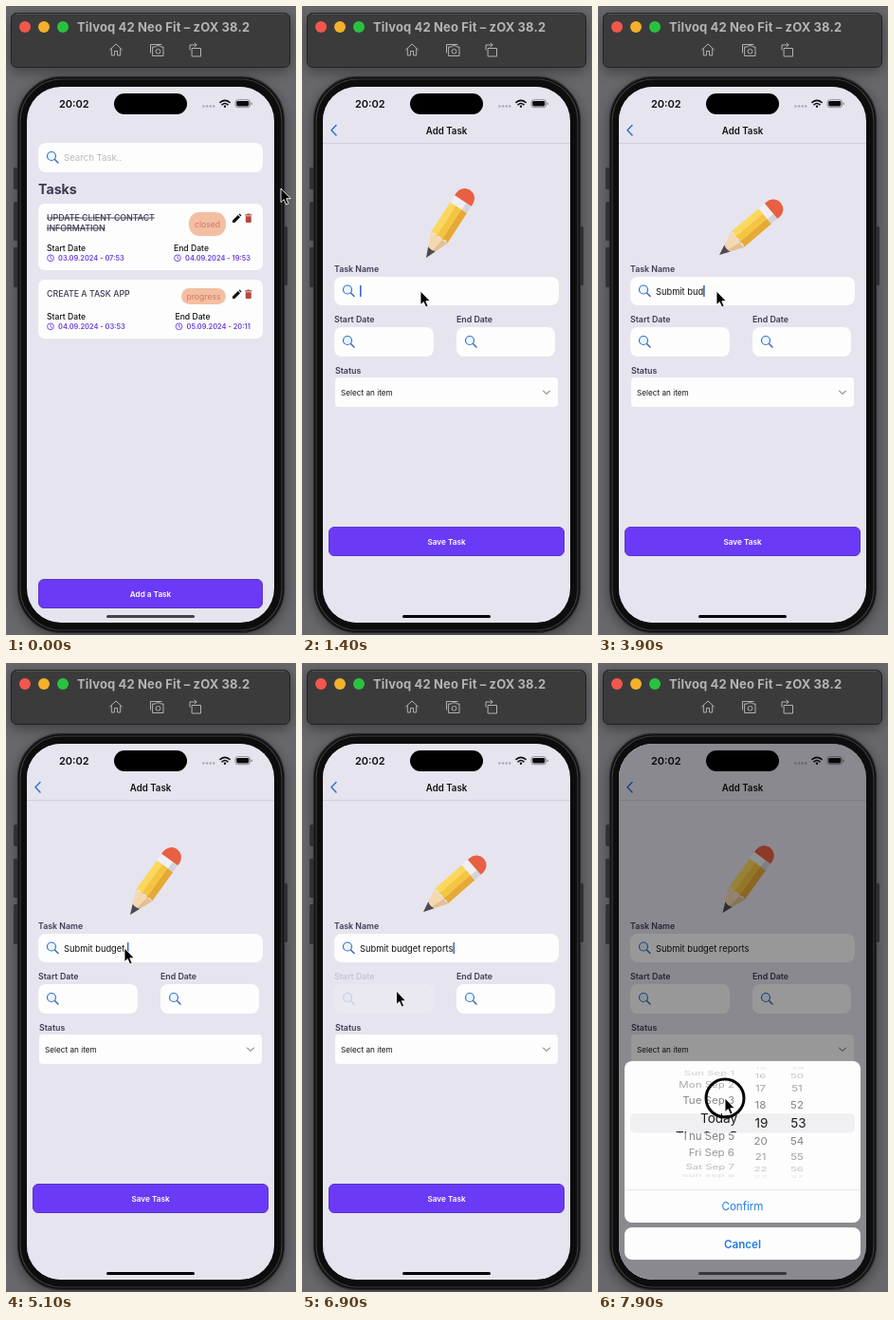
Animation, 306 px wide and 662 px high, one loop 8000 ms. Source, as an HTML page:

```html
<!DOCTYPE html>
<html lang="en">
<head>
<meta charset="utf-8">
<title>Task app</title>
<style>
html, body { margin: 0; width: 100%; height: 100%; overflow: hidden; background: #68676b; }
svg { position: fixed; left: 0; top: 0; font-family: Inter, Roboto, sans-serif; }
text { white-space: pre; }
</style>
</head>
<body>
<svg id="stage" width="306" height="662" viewBox="0 0 306 662"></svg>
<script>
const LOOP = 8000, STEP = 100;
const INK = '#3c3b54', VIOLET = '#6b3af7', BLUE = '#2f73d0', PAPER = '#e6e4ee', WHITE = '#fdfdfd';

// Markup helpers
const rect = (x, y, w, h, r, fill, more = '') =>
  `<rect x="${x}" y="${y}" width="${w}" height="${h}" rx="${r}" fill="${fill}" ${more}/>`;
const text = (x, y, size, weight, fill, str, more = '') =>
  `<text x="${x}" y="${y}" font-size="${size}" font-weight="${weight}" fill="${fill}" ${more}>${str}</text>`;
const mid = 'text-anchor="middle"';
const line = (d, color, width = 1, more = '') =>
  `<path d="${d}" fill="none" stroke="${color}" stroke-width="${width}" stroke-linecap="round" stroke-linejoin="round" ${more}/>`;
const shape = (d, fill) => `<path d="${d}" fill="${fill}"/>`;
const disc = (x, y, r, fill, more = '') => `<circle cx="${x}" cy="${y}" r="${r}" fill="${fill}" ${more}/>`;
const at = (x, y, body) => `<g transform="translate(${x} ${y})">${body}</g>`;

const lens = (x, y) => at(x, y,
  disc(0, 0, 4.5, '#eef5fc', `stroke="${BLUE}" stroke-width="1.2"`) +
  line('M3.5 3.5L7 7', '#3a6cb4', 1.5));
const clock = (x, y) => at(x, y,
  disc(0, 0, 3.4, 'none', `stroke="${VIOLET}" stroke-width=".9"`) + line('M0-2V.3L1.5 1', VIOLET, .8));
const button = (x, y, w, label) =>
  rect(x + .5, y - .5, w - 1, 30, 5.5, VIOLET, 'stroke="#5a35c4"') +
  text(152.5, y + 18, 8.2, 600, '#fff', label, mid);

function stamp(x, y, label, when) {
  return text(x, y, 8.6, 500, '#111', label) + clock(x + 4, y + 7.3) +
    text(x + 12, y + 10, 7.4, 600, '#6a3fe0', when);
}

function card(y, h, lines, badge, start, end, endX) {
  const [bx, by, bw, bh, word] = badge;
  return rect(34, y, 237, h, 7, WHITE) +
    lines.map((s, i) => text(43, y + 18 + i * 11, 8.8, 500, INK, s,
      lines.length > 1 ? 'text-decoration="line-through"' : '')).join('') +
    rect(bx, by, bw, bh, Math.min(11, bh / 2), '#f3bfa3') +
    text(bx + bw / 2, by + bh / 2 + 3, 8.6, 400, '#d8775a', word, mid) +
    at(243.5, y + 15.5, shape('M-4.5 4.5V2.2L1.3-3.6 3.6-1.3-2.2 4.5ZM2-4.2 3-5.1 5.1-3 4.2-2Z', '#111')) +
    at(255.8, y + 15.5, shape('M-3.6-4.2H-1.6L-1-5H1L1.6-4.2H3.6V-3H-3.6ZM-3-2.3H3V3.6Q3 4.6 2 4.6H-2Q-3 4.6-3 3.6Z', '#b5483f')) +
    stamp(43, y + h - 20, 'Start Date', start) + stamp(endX, y + h - 20, 'End Date', end);
}

const listScreen = rect(22, 85, 261, 564, 0, PAPER) +
  rect(34, 144, 237, 31, 8, WHITE) + lens(48, 158) +
  text(61, 163, 9.6, 400, '#b9b9bf', 'Search Task..') +
  text(34, 198, 14.2, 700, INK, 'Tasks') +
  card(208, 70, ['UPDATE CLIENT CONTACT', 'INFORMATION'], [193, 217, 39, 25, 'closed'],
    '03.09.2024 - 07:53', '04.09.2024 - 19:53', 177) +
  card(288, 62, ['CREATE A TASK APP'], [185, 297, 47, 17, 'progress'],
    '04.09.2024 - 03:53', '05.09.2024 - 20:11', 178.5) +
  button(34, 604, 237, 'Add a Task');

const label = (x, y, s) => text(x, y, 8.8, 600, INK, s);
// Points up from its tip, 85 long, with a round eraser
const pencil =
  shape('M0 0L-10.5-25H10.5Z', '#f3d8b2') + shape('M0 0L10.5-25H4Z', '#e5bf94') +
  shape('M0 0L-4.6-11Q0-9 4.6-11Z', '#4b4a57') +
  shape('M-10.5-25Q-7-28-3.5-25V-64H-10.5Z', '#fbd85c') +
  shape('M-3.5-25Q0-28 3.5-25V-64H-3.5Z', '#f5c53f') +
  shape('M3.5-25Q7-28 10.5-25V-64H3.5Z', '#e6a935') +
  shape('M-10.5-63H10.5V-72H-10.5Z', '#f0eff4') + shape('M4-63H10.5V-72H4Z', '#d5d3dd') +
  shape('M-10.5-71.5H10.5V-74.5A10.5 10.5 0 0 0-10.5-74.5Z', '#e95f43');

const formScreen = rect(22, 85, 261, 564, 0, PAPER) +
  line('M22 144.5H283', '#cecbd6', .8) + line('M36 125.5L31 130.7 36 136', BLUE, 1.5) +
  text(152.5, 134.5, 9.7, 600, '#111', 'Add Task', mid) +
  `<g id="pencil">${pencil}</g>` +
  label(34, 280, 'Task Name') + rect(34, 285, 237, 30, 8, WHITE) + lens(48, 298.5) +
  '<text id="typed" x="61" y="304" font-size="9.3" fill="#111"></text>' +
  rect(0, 294, 1.6, 12, .5, '#3f66d6', 'id="caret"') +
  `<g id="start">${label(34, 333, 'Start Date') + rect(34, 338, 105, 31, 8, WHITE) + lens(48, 352)}</g>` +
  label(163, 333, 'End Date') + rect(163, 338, 104, 31, 8, WHITE) + lens(177, 352) +
  label(35, 387, 'Status') + rect(35, 391, 235, 31, 4, WHITE) +
  text(41, 410, 8.2, 400, '#111', 'Select an item') + line('M254.5 405L258 408.5 261.5 405', '#444', .9) +
  button(28, 549, 249, 'Save Task');

const statusBar = text(56, 107, 11, 600, '#0b0b0d', '20:02') +
  rect(114, 92, 77, 22, 11, '#000') +
  [208.5, 212.2, 215.8, 219.3].map(x => disc(x, 105.5, 1.2, '#a9a8b0')).join('') +
  line('M226 101.4Q231 97.2 236 101.4M228 103.8Q231 101.2 234 103.8', '#0b0b0d', 1.6) +
  disc(231, 105.8, 1.2, '#0b0b0d') +
  rect(242, 98.7, 15.5, 8, 2.4, 'none', 'stroke="#77767c" stroke-width=".8"') +
  rect(243.2, 99.9, 13.1, 5.6, 1.4, '#0b0b0d') + rect(258.6, 101.4, 1.1, 2.7, .5, '#77767c');

const sheet = rect(28, 419, 249, 170, 8, WHITE) + '<g id="rows"></g>' +
  rect(34, 474, 237, 20.5, 5, '#f0f0f2') + '<g id="focus" clip-path="url(#band)"></g>' +
  line('M28 554.5H277', '#dcdce0', .7) +
  text(152.5, 576, 11.6, 400, '#1f7bea', 'Confirm', mid) +
  rect(28, 594, 249, 34, 8, WHITE) + text(152.5, 615.5, 11.6, 600, '#1f7bea', 'Cancel', mid);

const windowBar = rect(5.5, 7.5, 294, 57, 6, '#3a3a3b', 'stroke="#202021" filter="url(#shadow)"') +
  line('M11 8.4H294', '#5a5a5c', .8) +
  ['#f2564d', '#f2b02c', '#2bc140'].map((c, i) => disc(20 + 20 * i, 22, 6, c)).join('') +
  text(75, 26.5, 13, 700, '#b4b4b6', 'Tilvoq 42 Neo Fit – zOX 38.2', 'letter-spacing=".13"') +
  line('M109.5 46L116 40 122.5 46M111.3 45V52H114.4V47.5H117.6V52H120.7V45', '#b2b2b4') +
  line('M152.5 49V40.5H164M155 43H157.8L158.8 41.8H162.2L163.2 43H166V52.5H155Z', '#b2b2b4') +
  disc(160.5, 47.8, 2.4, 'none', 'stroke="#b2b2b4"') +
  line('M196.5 44.5H205.5V53H196.5ZM194 46V41H201M199 39L201 41 199 43', '#b2b2b4');

const phone =
  [[8, 170, 23], [8, 206, 41], [8, 254, 42], [292, 232, 62]]
    .map(([x, y, h]) => rect(x, y, 5, h, 1.5, '#39393b')).join('') +
  rect(12.5, 74.5, 281, 585, 46, '#080809', 'stroke="#2c2c2e" stroke-width="1.4" filter="url(#shadow)"') +
  rect(15, 77, 276, 580, 44, 'none', 'stroke="#39393b" stroke-width="1.2"');

const $ = id => document.getElementById(id);
$('stage').innerHTML = `<defs>
  <clipPath id="glass">${rect(22, 85, 261, 564, 36, '#000')}</clipPath>
  <clipPath id="band">${rect(34, 474, 237, 20.5, 5, '#000')}</clipPath>
  <filter id="shadow" x="-20%" y="-40%" width="140%" height="180%">
    <feDropShadow dx="0" dy="4" stdDeviation="7" flood-opacity=".4"/></filter></defs>` +
  rect(0, 0, 306, 662, 0, '#68676b') + windowBar + phone +
  `<g clip-path="url(#glass)"><g id="list">${listScreen}</g>
    ${rect(22, 85, 261, 564, 0, '#000', 'id="shade"')}
    <g id="form">${formScreen}</g>${statusBar}
    ${rect(22, 85, 261, 564, 0, '#000', 'id="dim"')}
    ${rect(106, 641, 93, 3, 1.5, '#000', 'id="bar"')}
    <g id="sheet">${sheet}</g></g>` +
  disc(134, 458, 20, 'none', 'id="ring" stroke="#050505" stroke-width="3"') +
  '<path id="cursor" d="M0 0V14.6L3.3 11.6 5.6 17 8.1 15.9 5.8 10.7H10.3Z" fill="#000" stroke="#fff" stroke-width=".9"/>';

// Motion
const clamp = u => Math.max(0, Math.min(1, u));
const smooth = u => u * u * (3 - 2 * u);
const easeOut = u => 1 - (1 - u) ** 3;
const span = (t, a, b) => clamp((t - a) / (b - a));

function track(keys, t, ease = smooth) {
  let i = 0;
  while (i < keys.length - 2 && t >= keys[i + 1][0]) i++;
  const [a, b] = [keys[i], keys[i + 1]];
  const u = ease(span(t, a[0], b[0]));
  return a.slice(1).map((v, k) => v + (b[k + 1] - v) * u);
}

const MESSAGE = 'Submit budget reports';
const typing = [[2300, 0], [2600, 2.2], [3900, 10.2], [4300, 14], [5450, 14], [6100, 21]];
const pointer = [[0, 290, 192], [100, 290, 192], [550, 140, 614], [850, 140, 614], [1250, 125, 300],
  [5150, 125, 300], [5450, 129, 338], [6300, 130, 341], [6650, 99.5, 345], [7150, 99.5, 345],
  [7550, 134, 465], [7700, 134, 465], [7900, 134, 458]];
// time, tilt, tip x, tip y
const tilt = [[700, 45, 129, 263], [1400, 33, 131, 265], [2600, 49.4, 128, 262], [3250, 53, 128, 262],
  [3900, 49.8, 128, 262], [5100, 35.7, 131, 265], [6200, 53, 128, 262], [6900, 48.8, 128, 262],
  [7900, 36, 131.5, 263]];

const days = ['Sat Aug 31', 'Sun Sep 1', 'Mon Sep 2', 'Tue Sep 3', 'Today',
  'Thu Sep 5', 'Fri Sep 6', 'Sat Sep 7', 'Sun Sep 8'];
const numbers = from => days.map((_, i) => from + i);

// Rows lie on a cylinder; "zoom" is the larger copy inside the band
function wheel(items, pos, x, anchor, zoom) {
  return items.map((item, i) => {
    const a = (i - pos) * .326, c = Math.cos(a);
    if (Math.abs(a) > 1.35) return '';
    const y = 484 + 59 * Math.sin(a), size = zoom ? 13.5 : 11.5;
    return `<text transform="translate(${x} ${y + size * .36 * c}) scale(1 ${c})" font-size="${size}"
      text-anchor="${anchor}" fill="#1a1a1c" opacity="${zoom ? 1 : .08 + .52 * c * c}">${item}</text>`;
  }).join('');
}
const wheels = (pos, zoom) => wheel(days, pos, zoom ? 147 : 144, 'end', zoom) +
  wheel(numbers(15), 4, zoom ? 172.5 : 171.5, 'middle', zoom) +
  wheel(numbers(49), 4, zoom ? 211.5 : 210, 'middle', zoom);

const set = (id, attrs) => { for (const k in attrs) $(id).setAttribute(k, attrs[k]); };

function draw(t) {
  const push = easeOut(span(t, 700, 1200));
  set('list', { transform: `translate(${-78 * push} 0)` });
  set('shade', { opacity: .1 * push });
  set('form', { transform: `translate(${261 * (1 - push)} 0)` });

  const [angle, px, py] = track(tilt, t);
  set('pencil', { transform: `translate(${px} ${py}) rotate(${angle})` });

  const typed = $('typed');
  typed.textContent = MESSAGE.slice(0, Math.floor(track(typing, t, u => u)[0] + 1e-6));
  const idleFrom = t < 2300 ? 1250 : t < 4300 ? t : t < 5450 ? 4300 : t < 6100 ? t : 6100;
  const blink = clamp(.5 + 1.5 * Math.cos((t - idleFrom) * Math.PI / 500));
  const width = typed.textContent ? typed.getComputedTextLength() : 0;
  set('caret', { x: 61 + width, opacity: t >= 1250 && t < 7050 ? blink : 0 });
  set('start', { opacity: 1 - .82 * (span(t, 6650, 6800) - span(t, 6950, 7200)) });

  const rise = easeOut(span(t, 7050, 7400));
  set('dim', { opacity: .4 * rise });
  set('bar', { opacity: .7 + .3 * push - .4 * rise });
  set('sheet', { transform: `translate(0 ${240 * (1 - rise)})` });
  const pos = 4 + .26 * smooth(span(t, 7700, 7900));
  $('rows').innerHTML = wheels(pos, false);
  $('focus').innerHTML = wheels(pos, true);

  const [cx, cy] = track(pointer, t);
  set('cursor', { transform: `translate(${cx} ${cy})` });
  set('ring', { cx, cy, opacity: t >= 7700 ? 1 : 0 });
}

const begin = performance.now();
function tick() {
  const t = (performance.now() - begin) % LOOP;
  draw(Math.floor(t / STEP) * STEP);
  requestAnimationFrame(tick);
}
tick();
</script>
</body>
</html>
```
